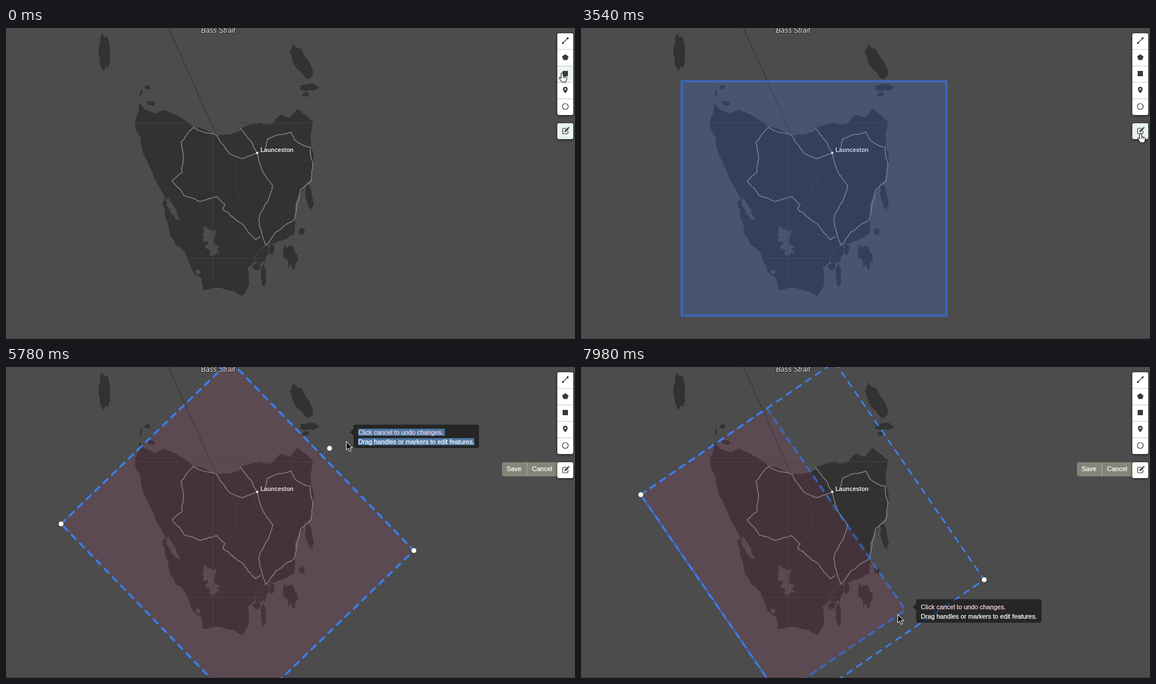
Recreate the animation shown at these times as an HTML page. Size 966 by 529 pixels, loop 8 s.

```html
<!DOCTYPE html>
<html lang="en">
<head>
<meta charset="utf-8">
<title>Rectangle editing on a map</title>
<style>
html, body { margin: 0; width: 100%; height: 100%; overflow: hidden; background: #4c4c4c; }
svg { position: absolute; left: 0; top: 0; font-family: "Liberation Sans", Arial, sans-serif; }
#tip {
  position: absolute; left: 0; top: 0; padding: 5px 8px 3px; border-radius: 4px;
  background: rgba(0,0,0,.5); color: #fff; white-space: nowrap;
  font: 10.85px/16px "Liberation Sans", Arial, sans-serif; -webkit-text-stroke: .25px;
}
#tip::before {
  content: ""; position: absolute; left: -6px; top: 7px;
  border: 6px solid transparent; border-left: 0; border-right-color: rgba(0,0,0,.5);
}
#tip div:first-child:not(:last-child) { color: #f8d5e4; }
#tip.picked span { background: #4f78a3; }
#tip.picked div:first-child span { padding-right: 3px; }
.land { fill: #323232; stroke: #555; stroke-width: .6; }
.sea { fill: #4c4c4c; }
.road { fill: none; stroke: #868686; stroke-width: 1.4; }
.lane { fill: none; stroke: #434343; stroke-width: .8; }
.seam { stroke: #414141; }
.bar { filter: drop-shadow(0 1px 2px rgba(0,0,0,.65)); }
.icon { fill: #3a3a3a; }
.line { fill: none; stroke: #3a3a3a; stroke-width: 1.2; }
.action { fill: #858478; }
.label { fill: #fff; stroke: #fff; stroke-width: .25; font-size: 11px; }
.halo { stroke: #2b2b2b; stroke-width: 2; paint-order: stroke; fill: #eee; }
.knob { fill: #fff; stroke: #333; }
.cursor { stroke-linejoin: round; }
</style>
</head>
<body>
<svg id="map" width="966" height="529">
  <g id="ground"></g>
  <path class="seam" d="M218 161.5H522M351.5 183V437M305 391.5H435"/>
  <path d="M276 0L357 182" stroke="#393939" stroke-width="1.5"/>
  <rect y="528" width="966" height="1" fill="#383838"/>
  <circle cx="426.5" cy="212.5" r="2.3" fill="#fff" stroke="#333" stroke-width=".5"/>
  <text class="halo" x="432" y="211" font-size="10" font-weight="bold">Launceston</text>
  <text class="halo" x="331" y="7.5" font-size="12" font-style="italic">Bass Strait</text>
  <g stroke="#3477f5" stroke-linecap="round" stroke-linejoin="round">
    <path id="shape" stroke-width="4" stroke-opacity=".6"/>
    <path id="frame" fill="none" stroke="#3c80f0" stroke-width="2.8" stroke-dasharray="10 10"/>
    <path id="stem" stroke-width="1.5" stroke-opacity=".5"/>
  </g>
  <g id="knobs"></g>
</svg>
<div id="tip"></div>
<svg id="ui" width="966" height="529">
  <g id="cancelDraw">
    <path class="action" d="M936 64H889a4 4 0 0 0-4 4V87a4 4 0 0 0 4 4H936z"/>
    <text class="label" x="893" y="81">Cancel</text>
  </g>
  <g id="editActions">
    <path class="action" d="M936 162H846a4 4 0 0 0-4 4V182a4 4 0 0 0 4 4H936z"/>
    <path d="M884.5 162V186" stroke="#aaa"/>
    <text class="label" x="850" y="177">Save</text>
    <text class="label" x="893" y="177">Cancel</text>
  </g>
  <g class="bar" fill="#fff">
    <rect x="936" y="9" width="27" height="139" rx="3"/>
    <rect id="editButton" x="936" y="162" width="27" height="27" rx="3"/>
  </g>
  <rect id="hover" x="936" y="65" width="27" height="27" fill="#edf4ee"/>
  <path d="M936 36.5h27m-27 28h27m-27 28h27m-27 28h27" stroke="#ccc"/>
  <path class="line" d="M946 25L953 18"/>
  <path class="icon" d="M944 24h3v3h-3zM952 16h3v3h-3zM949.5 44.5L955 48.5L953 54.5H946.5L944 48.5zM945 73h9v9h-9z"/>
  <path class="icon" fill-rule="evenodd" d="M949.5 111Q945.5 106.5 945.5 104a4 4 0 0 1 8 0Q953.5 106.5 949.5 111zM949.5 102.5a1.5 1.5 0 1 0 .01 0z"/>
  <circle class="line" cx="949.5" cy="133.5" r="5"/>
  <path class="line" d="M951 170.5H946.5Q945 170.5 945 172V178.5Q945 180 946.5 180H952.5Q954 180 954 178.5V175"/>
  <path class="icon" d="M948 177l.5-2.5l5-5l2 2l-5 5zM954 169l1-1l2 2l-1 1z"/>
  <path id="cursor" class="cursor"/>
</svg>
<script>
const $ = id => document.getElementById(id);
const set = (el, attrs) => { for (const k in attrs) el.setAttribute(k, attrs[k]); return el; };
const show = (el, on) => { el.style.display = on ? "" : "none"; };
const add = (parent, tag, attrs) =>
  parent.appendChild(set(document.createElementNS("http://www.w3.org/2000/svg", tag), attrs));
const poly = pts => "M" + pts.map(p => p.join()).join("L") + "z";

let seed = 7;
const jitter = a => ((seed = seed * 16807 % 2147483647) / 2147483647 - .5) * 2 * a;

// Roughen each side by repeated midpoint displacement
function split([x, y], [u, v], amp) {
  const len = Math.hypot(u - x, v - y);
  if (len < 5) return [[u, v]];
  const mid = [(x + u) / 2 + jitter(amp * len), (y + v) / 2 + jitter(amp * len)];
  return [...split([x, y], mid, amp), ...split(mid, [u, v], amp)];
}
function rough(cls, amp, text) {
  const pts = text.split(" ").map(p => p.split(",").map(Number));
  const d = pts.slice(1).flatMap((p, i) => split(pts[i], p, amp));
  add($("ground"), "path", { class: cls, d: "M" + [pts[0], ...d].map(p => p.join()).join("L") });
}
// Ragged ellipse for small islands and lakes
function blob(cls, cx, cy, rx, ry, tilt = 0, amp = .18) {
  const pts = Array.from({ length: 24 }, (_, i) => {
    const a = i * Math.PI / 12, r = 1 + jitter(amp);
    return [rx * r * Math.cos(a), ry * r * Math.sin(a)];
  });
  add($("ground"), "path", { class: cls, d: poly(pts), transform: `translate(${cx} ${cy}) rotate(${tilt})` });
}

rough("land", .1, "226,127 254,145 270,139 291,149 318,168 358,183 398,174 400,169 432,161 450,163 468,147 482,152 " +
  "494,137 507,147 522,158 518,180 520,205 517,258 500,282 491,326 490,350 474,360 455,367 442,371 425,394 411,407 " +
  "413,437 401,456 376,446 334,446 330,425 317,415 308,393 288,370 271,325 265,297 270,290 249,247 232,212 221,175 " +
  "218,161 226,127");
blob("land", 167, 40, 11, 29);
blob("land", 501, 56, 12, 33, -32);
blob("land", 515, 101, 18, 6);
blob("land", 509, 113, 6, 4);
blob("land", 240, 101, 5, 4);
blob("land", 229, 111, 2, 7, 15);
blob("land", 246, 128, 7, 4, 15);
blob("land", 515, 286, 6, 25, -10);
blob("land", 502, 346, 6, 6);
blob("land", 484, 388, 12, 22, -15, .3);
blob("land", 435, 386, 9, 17, 25, .3);
blob("land", 437, 420, 5, 20);
blob("land", 425, 406, 7, 6);
blob("land", 451, 376, 5, 10);
blob("sea", 282, 308, 5, 22, -27, .3);
blob("sea", 344, 353, 11, 15, 0, .4);
blob("sea", 351, 374, 9, 13, -25, .4);
blob("sea", 326, 415, 4, 4);

for (const lane of ["386,222 391,275 405,310 426,322", "427,217 400,258 400,270",
  "517,222 480,245 450,254", "362,360 400,351 424,358"]) rough("lane", .08, lane);
for (const road of ["318,169 297,195 301,225 299,246 282,260 302,285 330,295 358,287 372,300 368,308 403,335 424,360 432,355",
  "318,169 358,183 379,213 400,222 426,213 453,268 444,295 429,325 434,348 441,370",
  "438,207 444,189 484,177 490,190 517,203 518,260 500,275 490,325 457,348 441,370",
  "398,170 405,180 426,213"]) rough("road", .07, road);

// Pointer moves: start, end, x, y, sag of the path
const moves = [
  [0, 1, 944, 76],
  [200, 960, 171, 90, 140],
  [1040, 1820, 617.5, 459],
  [1820, 1980, 620.5, 489.5],
  [2660, 3280, 950, 179],
  [3960, 4380, 443, 95],
  [4380, 4720, 395, 73],
  [5220, 5740, 572, 116, -35],
  [5740, 5960, 592, 153],
  [6180, 6760, 634, 312],
  [6800, 7100, 685, 361],
  [7590, 7940, 551, 413],
  [7940, 8060, 525, 428]
];
function at(t) {
  let [, , x, y] = moves[0];
  for (const [from, to, u, v, sag = 0] of moves) {
    if (t < from) break;
    const f = Math.sin(Math.min(1, (t - from) / (to - from)) * Math.PI / 2);
    x += (u - x) * f;
    y += (v - y) * f + sag * 4 * f * (1 - f);
  }
  return [x, y];
}

const cursors = {
  hand: ["#fff", "#000", "M-1.6 1Q0-1 1.6 1L2.2 6Q3.7 5 4.6 6.6Q6 5.8 6.6 7.4Q8 7 8 9L7.7 12.5L6.2 16H-.5L-4.7 9.5Q-5.5 7.6-4 7.6Q-2.8 8-1.5 10zM2.2 6V9M4.6 7V9.5"],
  grab: ["#fff", "#000", "M-4 7L-7 1Q-6.5-.8-4.5 1.5L-5.5-4Q-4.500-6-3.2-4L-2.2-.5L-2-6Q-.5-7.5.6-6L.8-.5L2.2-5.500Q3.8-6.8 4.4-5L3.6 0L5.2-3Q6.8-3.6 7-2L5 4L4 7.5z"],
  cross: ["#fff", "#111", "M-1-7H1V-1H7V1H1V7H-1V1H-7V-1H-1z"],
  arrow: ["#111", "#fff", "M0 0V14.5L3.3 11.5L5.6 17L8.2 16L5.9 10.7H10.3z"]
};
const W = 224.5, H = 199.5, LAG = 40;
const DRAW = 1040, DROP = 2280, EDIT = 3580, TURN = 5240, TURNED = 6000, PULL = 7590;

function cursorAt(t, x) {
  if (t > PULL || t > TURN && t < TURNED + 120) return "arrow";
  if (t > 260 && t < DROP) return "cross";
  return x > 930 || t > TURN - 600 ? "hand" : "grab";
}

const knobs = Array.from({ length: 5 }, () => add($("knobs"), "circle", { class: "knob", r: 4.7 }));

let tipHtml = "";
function setTip(...lines) {
  const html = lines.map(s => `<div><span>${s}</span></div>`).join("");
  if (html !== tipHtml) $("tip").innerHTML = tipHtml = html;
}

function editShape(t, lag) {
  const [px, py] = at(Math.min(t - LAG, TURNED));
  const a = t < TURN ? 0 : Math.atan2(px - 393, 289.5 - py);
  const cx = 395.5 - 2.5 * Math.min(1, a / .8), cos = Math.cos(a), sin = Math.sin(a);
  const spin = (x, y) => [cx + x * cos - y * sin, 289.5 + x * sin + y * cos];
  const box = [spin(-W, H), spin(-W, -H), spin(W, -H), spin(W, H)];
  let inner = box;
  if (t > PULL) {
    // Keep the opposite corner fixed; the pulled corner follows the pointer
    const [ox, oy] = box[0], dx = lag[0] - ox, dy = lag[1] - oy;
    const u = dx * cos + dy * sin, v = dy * cos - dx * sin;
    inner = [box[0], [ox - v * sin, oy + v * cos], lag, [ox + u * cos, oy + u * sin]];
  }
  set($("shape"), { d: poly(inner), fill: "#e0407c", "fill-opacity": .1, "stroke-dasharray": "10 10" });
  set($("frame"), { d: poly(box) });
  const top = spin(0, -H), grip = spin(0, -H - 18);
  set($("stem"), { d: `M${top}L${grip}` });
  [...box, grip].forEach(([x, y], i) => set(knobs[i], { cx: x, cy: y }));
  show(knobs[4], t < PULL);
  show($("stem"), t < PULL);
}

function drawTip(t, [x, y], area) {
  const tip = $("tip");
  show(tip, t >= 280 && t < DROP || t >= 4020);
  if (t >= EDIT) setTip("Click cancel to undo changes.", "Drag handles or markers to edit features.");
  else if (t >= DRAW) setTip(area.toFixed(2) + " ha", "Release mouse to finish drawing.");
  else setTip("Click and drag to draw rectangle.");
  tip.className = t > TURN && t < PULL ? "picked" : "";
  tip.style.transform = `translate(${Math.round(x + 18)}px, ${Math.round(y - (t < DRAW ? 12 : 18.5))}px)`;
}

function render(t) {
  const pos = at(t), lag = at(t - LAG), editing = t >= EDIT;
  const [fill, stroke, d] = cursors[cursorAt(t, pos[0])];
  set($("cursor"), { fill, stroke, d, transform: `translate(${pos})` });

  show($("hover"), t < 200);
  show($("cancelDraw"), t >= 200 && t < DROP);
  show($("editActions"), editing);
  set($("editButton"), { fill: editing ? "#fff" : "#e9f3ed" });
  show($("shape"), t >= DRAW);
  for (const id of ["frame", "stem", "knobs"]) show($(id), editing);

  const [x, y] = at(Math.min(t, DROP) - LAG);
  if (editing) editShape(t, lag);
  else set($("shape"), {
    d: `M171 90.5H${x}V${y}H171z`, fill: "#3477f5", "fill-opacity": .2, "stroke-dasharray": "none"
  });
  drawTip(t, lag, (x - 171) * (y - 90) * 101.1113);
}

function tick() {
  render(performance.now() % 8000);
  requestAnimationFrame(tick);
}
tick();
</script>
</body>
</html>
```
